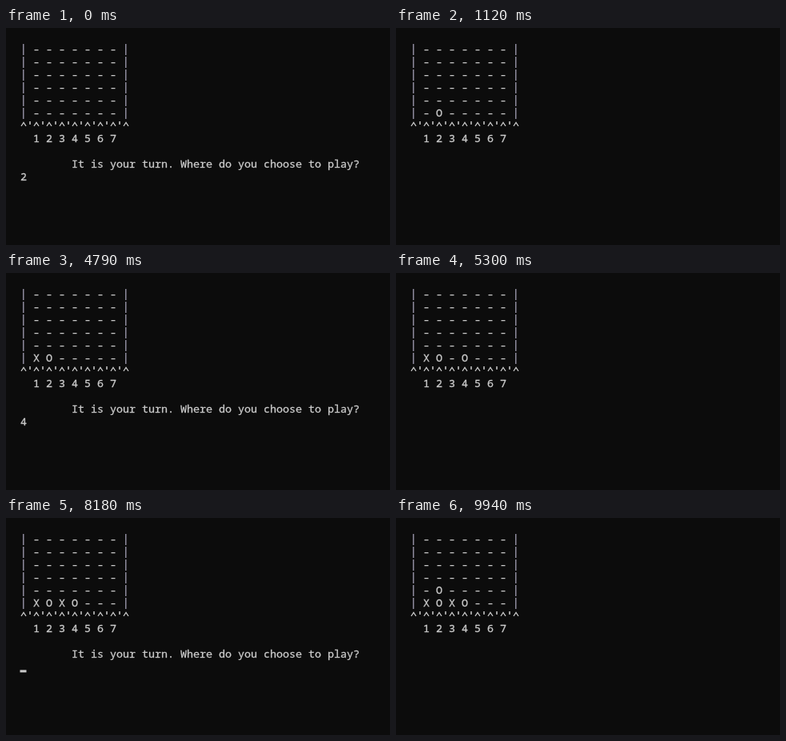
Write an HTML page with a canvas that moves like this. It is 480 by 272 pixels and loops after 10000 ms.

```html
<!DOCTYPE html>
<html>
<head>
<meta charset="utf-8">
<style>
html, body { margin: 0; width: 480px; height: 272px; overflow: hidden; background: #0c0c0c; }
canvas { display: block; }
</style>
</head>
<body>
<canvas id="screen" width="480" height="272"></canvas>
<script>
const LOOP = 10000, CELL_W = 8, CELL_H = 16, LEFT = 18, BASELINE = 31, CLEAR_MS = 30;
const QUESTION = 'It is your turn. Where do you choose to play?';
const ctx = document.getElementById('screen').getContext('2d');

// Each piece falls one row per step, then the board is printed once more.
// The cleared screen is visible at the beginning of every step from flashFrom on.
const drops = [
  { piece: 'O', col: 1, row: 5, start: 520, step: 95, flashFrom: 0 },
  { piece: 'X', col: 0, row: 5, start: 2120, step: 96.6, flashFrom: 6 },
  { piece: 'O', col: 3, row: 5, start: 4820, step: 96, flashFrom: 7 },
  { piece: 'X', col: 2, row: 5, start: 6450, step: 97.5, flashFrom: 6 },
  { piece: 'O', col: 1, row: 4, start: 8850, step: 90, flashFrom: 0 }
];

const prompts = [
  { start: 0, typed: 0, end: 520, key: '2' },
  { start: 3760, typed: 4610, end: 4820, key: '4' },
  { start: 8030, typed: 8640, end: 8850, key: '2' }
];

const cursors = [
  { start: 210, end: 520, col: 1 },
  { start: 3760, end: 4420, col: 0 },
  { start: 4610, end: 4790, col: 1 },
  { start: 8030, end: 8640, col: 0 },
  { start: 8640, end: 8850, col: 1 }
];

const active = (list, t) => list.find(p => t >= p.start && t < p.end);

function box(x, y, w, h, color = '#ccc') {
  ctx.fillStyle = color;
  ctx.fillRect(x, y, w, h);
}

function caret(x, y) {
  ctx.lineWidth = 1.3;
  ctx.beginPath();
  ctx.moveTo(x + 1, y - 4);
  ctx.lineTo(x + 4, y - 8.5);
  ctx.lineTo(x + 7, y - 4);
  ctx.stroke();
}

// A thin outline gives letters the heavier stroke of a console font.
function letter(ch, x, y) {
  ctx.fillStyle = '#ccc';
  ctx.fillText(ch, x, y);
  ctx.lineWidth = 0.3;
  ctx.strokeText(ch, x, y);
}

const glyphs = {
  '|': (x, y) => box(x + 3, y - 11, 1.5, 14, '#8d8a9c'),
  '-': (x, y) => box(x + 1.5, y - 4, 5, 1.25),
  "'": (x, y) => box(x + 3.25, y - 10, 1.5, 4),
  '^': caret
};

function print(text, col, row) {
  [...text].forEach((ch, i) => {
    const x = LEFT + (col + i) * CELL_W, y = BASELINE + row * CELL_H;
    if (glyphs[ch]) glyphs[ch](x, y);
    else letter(ch, x, y);
  });
}

function draw(t) {
  box(0, 0, 480, 272, '#0c0c0c');
  ctx.font = '13.333px "Noto Sans Mono", "DejaVu Sans Mono", monospace';
  ctx.strokeStyle = '#ccc';

  const board = Array.from({ length: 6 }, () => Array(7).fill('-'));
  for (const d of drops) {
    const age = t - d.start;
    if (age < 0) break;
    const k = Math.floor(age / d.step);
    if (k >= d.flashFrom && k <= d.row + 1 && age - k * d.step < CLEAR_MS) return;
    board[Math.min(k, d.row)][d.col] = d.piece;
  }
  board.forEach((cells, row) => print('| ' + cells.join(' ') + ' |', 0, row));
  print("^'".repeat(8) + '^', 0, 6);
  print('1 2 3 4 5 6 7', 2, 7);

  const prompt = active(prompts, t);
  if (prompt) {
    print(QUESTION, 8, 9);
    if (t >= prompt.typed) print(prompt.key, 0, 10);
  }
  const cursor = active(cursors, t);
  if (cursor) box(LEFT - 0.5 + cursor.col * CELL_W, 190.5, CELL_W, 3);
}

const began = performance.now();
function tick() {
  draw((performance.now() - began) % LOOP);
  requestAnimationFrame(tick);
}
tick();
</script>
</body>
</html>
```
